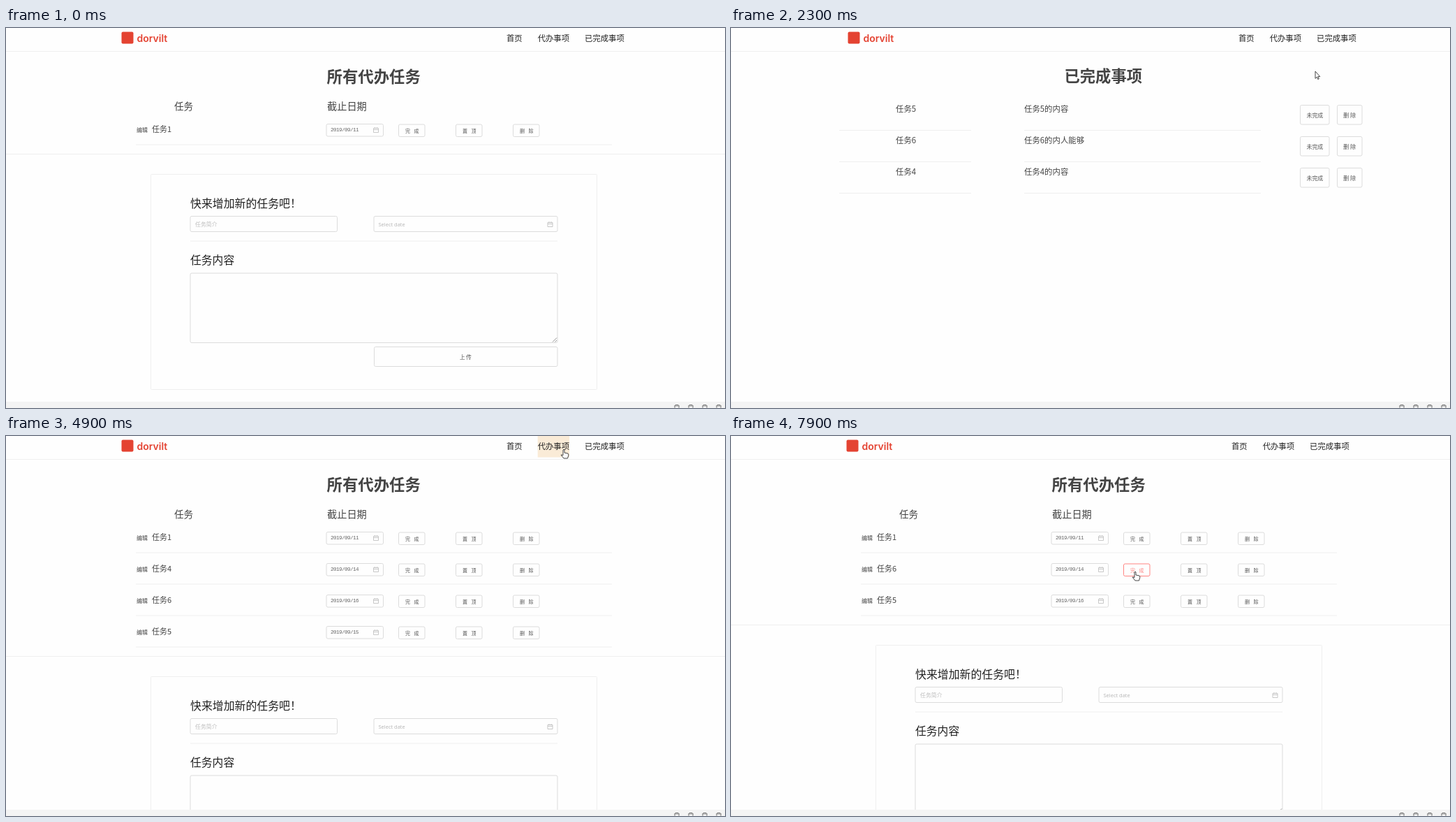
These frames come from a looping animation (1030 px wide and 544 px high, 8000 ms). An HTML page:

```html
<!DOCTYPE html>
<html lang="zh">
<head>
<meta charset="utf-8">
<title>任务</title>
<style>
  html, body { margin: 0; width: 100%; height: 100%; overflow: hidden; background: #fefefe; }
  svg { display: block; width: 1030px; height: 544px; }
  text { font-family: "Noto Sans CJK SC", "Noto Sans CJK", "Noto Sans", sans-serif; white-space: pre; }
  .date { font-family: "Liberation Mono", monospace; letter-spacing: -.5px; }
  .latin { font-family: "Open Sans", sans-serif; }
  .brand { font-family: Inter, sans-serif; font-weight: 600; }
  .bold { font-weight: 700; }
  .medium { font-weight: 500; }
  .light { font-weight: 300; }
  .wide { font-weight: 300; letter-spacing: 2px; }
</style>
</head>
<body>
<svg id="stage" viewBox="0 0 1030 544"></svg>
<script>
const LOOP = 8000, STEP = 100, ROW = 45, GLIDE = 300;
const RED = '#ff8582', EDGE = '#dcdcdc', RULE = '#efefef', INK = '#222', SOFT = '#444';
const DONE_AT = 1600, TODO_AT = 4900, REMOVE_AT = 7700;

const undo = row => [831, 120 + ROW * row];
const finish = row => [578, 147 + ROW * row];

// The pointer rests, then glides to each stop: arrival time, tip
const STOPS = [
  [100, [954, 12]], [900, [785, 13]], [1300, [849, 12]], [2100, [847, 31]], [2300, [837, 62]],
  [2700, undo(2)], [3500, undo(1)], [4100, undo(0)], [TODO_AT, [799, 19]], [5100, [795, 170]],
  [5600, [653, 248]], [5900, [630, 250]], [6100, [624, 150]], [6300, finish(0)],
  [6900, [578, 187]], [7900, [579, 194]]
];
const ease = k => k * k * (3 - 2 * k);

function pointerAt(t) {
  if (t < STOPS[0][0]) return null;
  const i = STOPS.findIndex(([at]) => at > t);
  if (i < 0) return STOPS[STOPS.length - 1][1];
  const [left, from] = STOPS[i - 1], [at, to] = STOPS[i];
  const begin = Math.max(left, at - GLIDE);
  const k = ease(Math.max(0, (t - begin) / (at - begin)));
  return from.map((v, n) => v + (to[n] - v) * k);
}

// cy is the optical middle of the line
const text = (x, cy, size, str, fill = INK, cls = '') =>
  `<text x="${x}" y="${cy + size * .38}" font-size="${size}" fill="${fill}" class="${cls}">${str}</text>`;
const box = (x, y, w, h, stroke = EDGE, r = 2) =>
  `<rect x="${x}" y="${y}" width="${w}" height="${h}" rx="${r}" fill="none" stroke="${stroke}"/>`;
const line = (d, stroke, width = 1, fill = 'none') =>
  `<path d="${d}" fill="${fill}" stroke="${stroke}" stroke-width="${width}"/>`;
const rule = (x1, x2, y) => line(`M${x1} ${y}H${x2}`, RULE);
const calendar = (x, y) =>
  line(`M${x} ${y + 1.5}h7v6h-7zm0 2h7m-5-3.500v2m3-2v2`, '#bbb', .8);

function draw(t) {
  const pos = pointerAt(t);
  let hot = false;

  function over(x, y, w, h) {
    const hit = pos && pos[0] >= x && pos[0] <= x + w && pos[1] >= y && pos[1] <= y + h;
    hot = hot || hit;
    return hit;
  }

  function button(x, y, w, h, tx, size, label, cls) {
    const hit = over(x, y, w, h);
    return box(x, y, w, h, hit ? RED : EDGE) +
      text(tx, y + h / 2 + .3, size, label, hit ? RED : '#555', cls);
  }

  function header(shift) {
    const logo = 165.5 + shift / 5, size = 11.35;
    let x = 717 + shift, nav = '';
    for (const label of ['首页', '代办事项', '已完成事项']) {
      const w = label.length * size;
      if (over(x, 0, w, 30.5)) nav += `<rect x="${x}" width="${w}" height="30.5" fill="#faebd7"/>`;
      nav += text(x, 14.5, size, label);
      x += w + 22;
    }
    return rule(0, 1030, 33.5) +
      `<rect x="${logo}" y="5.5" width="17" height="17" rx="2" fill="#e44332"/>` +
      text(logo + 22, 14.2, 14, 'dorvilt', '#e44332', 'brand') + nav;
  }

  function form(y) {
    return box(207.5, y, 639, 308, RULE, 1) +
      text(264, y + 41.5, 15.9, '快来增加新的任务吧！') +
      box(264, y + 60, 210.5, 22) + text(271, y + 71.5, 7.9, '任务简介', '#bfbfbf') +
      box(527, y + 60, 263, 22) + text(533.5, y + 71.5, 7.5, 'Select date', '#b5b5b5', 'latin') +
      calendar(776, y + 67.5) + rule(264, 790, y + 95.5) +
      text(264, y + 122.5, 15.8, '任务内容') +
      box(264, y + 141.5, 526, 99.5) + line(`M783 ${y + 240}l6-6m-2.500 6l2.500-2.500`, '#777', .8) +
      button(527.5, y + 247, 262.5, 28, 650, 7.6, '上 传');
  }

  function todoRow(id, date, y) {
    const buttons = ['完 成', '置 顶', '删 除'].map((label, k) =>
      button(562.5 + 82 * k, y + .5, 37.5, 17.5, 572 + 82 * k, 7, label, 'wide'));
    return text(187, y + 8, 8, '编辑', SOFT, 'light') +
      text(209, y + 7.7, 11, '任务' + id, SOFT, 'light') +
      box(459, y, 81.5, 17.5) + text(465, y + 8, 7.5, '2019/09/' + date, '#666', 'date') +
      calendar(526.5, y + 4.5) + buttons.join('') + rule(186, 868, y + 29.5);
  }

  function todoPage() {
    const tasks = t < DONE_AT ? [1] : t < REMOVE_AT ? [1, 4, 6, 5] : [1, 6, 5];
    const dates = [11, 14, 16, 15];
    const end = tasks.length * ROW;
    return header(0) + text(459.5, 69, 22.4, '所有代办任务', SOFT, 'bold') +
      text(241, 112, 13.6, '任务', SOFT) + text(460, 112, 14.2, '截止日期', SOFT) +
      tasks.map((id, i) => todoRow(id, dates[i], 137.5 + i * ROW)).join('') +
      rule(0, 1030, 135.5 + end) + form(164.5 + end);
  }

  function donePage() {
    const rows = [['任务5', '的内容', 4400], ['任务6', '的内人能够', 3800], ['任务4', '的内容', 3000]];
    return header(10) + text(477.5, 69, 22.3, '已完成事项', SOFT, 'bold') +
      rows.map(([name, note, gone], i) => {
        if (t >= gone) return '';
        const y = 110.5 + i * ROW;
        return text(236, y + 5, 11.4, name, SOFT, 'medium') +
          text(420, y + 5, 11.4, name + note, SOFT, 'medium') +
          rule(155, 344, y + 36) + rule(420, 759, y + 36) +
          button(815.5, y, 41.5, 27.5, 824.5, 7.9, '未完成') +
          button(868.5, y, 35.5, 27.5, 877, 8.2, '删 除');
      }).join('');
  }

  function footer() {
    let out = '<rect y="535" width="1030" height="9" fill="#f4f4f4"/>';
    for (let x = 957; x < 1030; x += 20) out += line(`M${x} 541h8m-6 0v-1.500h4v1.500m-5 0v3m6 0v-3`, '#777', .9);
    return out;
  }

  function pointer() {
    if (!pos) return '';
    const shape = hot && t > DONE_AT + 500
      ? 'M-1 8.500V1Q0-1 1 1V5L6 6 7 8 5.500 13H0L-4 8Z'
      : 'M0 0V10.300L2.300 8.200 3.800 11.500 5.300 10.800 3.800 7.600H6.800Z';
    return `<g transform="translate(${pos})">${line(shape, '#333', .9, '#fff')}</g>`;
  }

  const page = t >= DONE_AT && t < TODO_AT ? donePage() : todoPage();
  return page + footer() + pointer();
}

const stage = document.getElementById('stage');
const start = performance.now();
let shown = -1;

function tick() {
  const t = Math.floor((performance.now() - start) % LOOP / STEP) * STEP;
  if (t !== shown) {
    shown = t;
    stage.innerHTML = draw(t);
  }
  requestAnimationFrame(tick);
}
tick();
</script>
</body>
</html>
```
